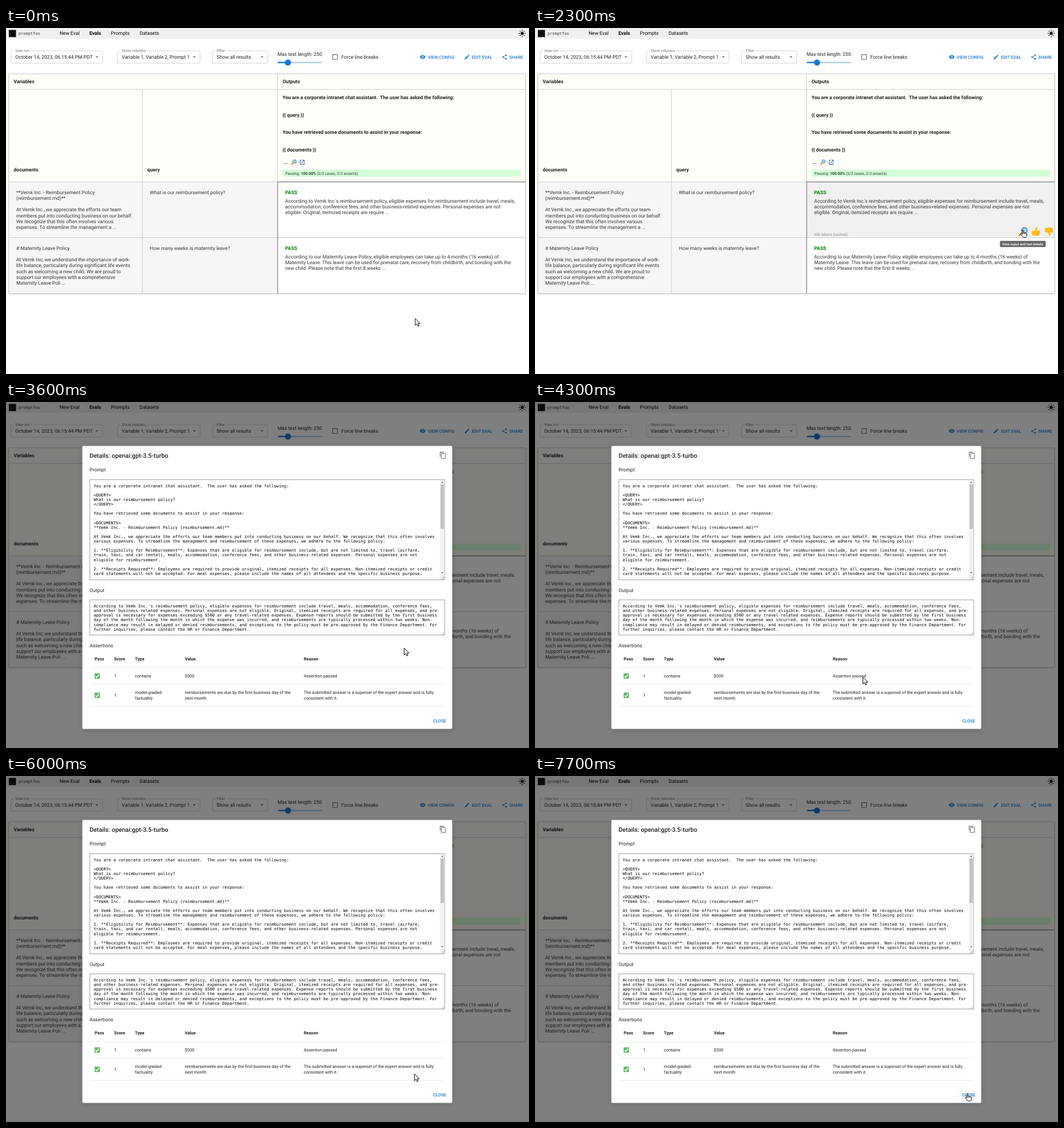
These frames come from a looping animation (920x608 px, 8000 ms). An HTML page:

```html
<!DOCTYPE html>
<html lang="en">
<head>
<meta charset="utf-8">
<title>Eval viewer</title>
<style>
  html, body { margin: 0; width: 100%; height: 100%; overflow: hidden; background: #fff; }
  svg { display: block; width: 920px; height: 608px; }
  text { font-family: Roboto, sans-serif; white-space: pre; text-rendering: geometricPrecision; }
  text.mono { font-family: "DejaVu Sans Mono", monospace; }
</style>
</head>
<body>
<svg id="stage" viewBox="0 0 920 608"></svg>
<script>
const K = 920 / 1700; // page zoom: CSS pixels to stage pixels
const INK = '#212121', BLUE = '#1976d2', LINE = '#ccc', DARK = '#888';
const ROW_H = 98;

const esc = s => s.replace(/&/g, '&amp;').replace(/</g, '&lt;');
const text = (x, y, s, { size = 16, weight = 400, fill = INK, cls = '' } = {}) =>
  `<text class="${cls}" x="${x}" y="${y}" font-size="${size * K}" font-weight="${weight}" fill="${fill}">${esc(s)}</text>`;
const lines = (x, y, pitch, list, opts) =>
  list.map((s, i) => s && text(x, y + i * pitch * K, s, opts)).join('');
const rect = (x, y, x2, y2, fill, extra = '') =>
  `<rect x="${x}" y="${y}" width="${x2 - x}" height="${y2 - y}" fill="${fill}" ${extra}/>`;
const path = (d, fill, extra = '') => `<path d="${d}" fill="${fill}" ${extra}/>`;
const stroke = (d, color, width, extra = '') =>
  path(d, 'none', `stroke="${color}" stroke-width="${width}" ${extra}`);
const group = (x, y, scale, body, extra = '') =>
  `<g transform="translate(${x} ${y}) scale(${scale})" ${extra}>${body}</g>`;
// 24-unit icon centred on a point
const icon = (cx, cy, size, body) => group(cx - size * K / 2, cy - size * K / 2, size * K / 24, body);

const bold = { weight: 700 };
const mono = { size: 13.36, cls: 'mono', fill: '#000' };
const cellText = { fill: '#333' };
const small = { size: 14 };
const button = { size: 14, weight: 500, fill: BLUE };

const magnifier = (x, y, size) => group(x, y, size / 16,
  stroke('M7 9L1.8 14.2', '#e8912d', 3, 'stroke-linecap="round"') +
  '<circle cx="10.2" cy="5.8" r="4.7" fill="#9fd3f5" stroke="#4a7fa8" stroke-width="1.5"/>');

const thumb =
  path('M1 8q0-1 1-1h2.5c2-1 3-3 3-5.5c0-1.5 2.4-1.6 2.8.6c.3 1.6-.2 2.8-.6 4h4c1.6 0 1.8 2 .6 2.4c1.3.5 1 2.2-.2 2.4c.9.7.4 2.1-.7 2.2c.6.9-.2 1.9-1.4 1.9H7c-2 0-2.5-1-4-1H2q-1 0-1-1z', '#fbbf24') +
  stroke('M10 8.5h4.3M10 10.9h4M10 13.1h3.3', '#e59a0c', .7);

const check = (x, y) =>
  rect(x, y, x + 9.4, y + 9.4, '#5fb863', 'rx="1"') +
  stroke(`M${x + 1.6} ${y + 5}l2.2 2.3l4-5.3`, '#fff', 1.6);

const select = (x, x2, label, labelEnd, value) =>
  stroke(`M${labelEnd + 2} 40.2H${x2 - 2.2}q2.2 0 2.2 2.2V59.6q0 2.2-2.2 2.2H${x + 2.2}q-2.2 0-2.2-2.2V42.4q0-2.2 2.2-2.2H${x + 5}`, '#c0c0c0', .7) +
  text(x + 7.4, 42.3, label, { size: 12, fill: '#666' }) +
  text(x + 7.4, 53.9, value) +
  path(`M${x2 - 12.8} 49.7h5.4l-2.7 2.7z`, '#757575');

function toolbar() {
  const rays = Array.from({ length: 8 }, (_, i) =>
    `<path d="M0-4.4V-5.8" transform="rotate(${i * 45})"/>`).join('');
  const eye = path('M12 4.5C7 4.5 2.7 7.6 1 12c1.7 4.4 6 7.5 11 7.5s9.3-3.1 11-7.5c-1.7-4.4-6-7.5-11-7.5z', BLUE) +
    '<circle cx="12" cy="12" r="4" fill="' + BLUE + '" stroke="#fff" stroke-width="2"/>';
  const pen = path('M3 17.3V21h3.7L17.8 9.9l-3.7-3.7zM20.7 7c.4-.4.4-1 0-1.4l-2.3-2.3c-.4-.4-1-.4-1.4 0l-1.9 1.8 3.8 3.8z', BLUE);
  const share = stroke('M18 5L6 12L18 19', BLUE, 2) +
    [[18, 5], [6, 12], [18, 19]].map(([x, y]) => `<circle cx="${x}" cy="${y}" r="3" fill="${BLUE}"/>`).join('');
  return rect(0, 0, 920, 19, '#f0f0f0') +
    rect(5, 3.4, 17.6, 16, '#111') +
    text(22, 12, 'promptfoo', { size: 13, cls: 'mono', fill: '#333' }) +
    text(94.2, 12.4, 'New Eval', { fill: '#000' }) + text(146.8, 12.4, 'Evals', { weight: 700, fill: '#000' }) +
    text(184.6, 12.4, 'Prompts', { fill: '#000' }) + text(235, 12.4, 'Datasets', { fill: '#000' }) +
    group(908, 9.4, 1, `<circle r="2.8" fill="#222"/><g stroke="#222" stroke-width="1.1" stroke-linecap="round">${rays}</g>`) +
    select(8.8, 170, 'View run', 42, 'October 14, 2023, 06:15:44 PM PDT') +
    select(196.2, 341.3, 'Show columns', 246, 'Variable 1, Variable 2, Prompt 1') +
    select(363.2, 460.4, 'Filter', 386, 'Show all results') +
    text(477.8, 48.6, 'Max text length: 250') +
    rect(478, 59.6, 556, 61.8, '#a7c8ec', 'rx="1.1"') + rect(478, 59.6, 496, 61.8, BLUE, 'rx="1.1"') +
    `<circle cx="496" cy="60.7" r="5.4" fill="${BLUE}"/>` +
    rect(574.7, 46.6, 583.3, 55.2, 'none', 'rx=".6" stroke="#666" stroke-width="1.1"') +
    text(589.8, 53.9, 'Force line breaks') +
    icon(733, 51, 20, eye) + text(742, 53.6, 'VIEW CONFIG', button) +
    icon(811, 51, 20, pen) + text(819.8, 53.6, 'EDIT EVAL', button) +
    icon(877, 51, 20, share) + text(885.6, 53.6, 'SHARE', button);
}

const row = (y, doc, query, answer) =>
  lines(18, y + 21.1, 19, doc, cellText) +
  text(253, y + 21.1, query, cellText) +
  text(491, y + 21.6, 'PASS', { weight: 700, fill: '#008000' }) +
  lines(491, y + 36.1, 19, answer, cellText);

const hoverBar = (id, y) => `<g id="${id}">` +
  magnifier(850.5, y + 79, 16.5) + group(873, y + 79, 1.03, thumb) +
  `<g transform="translate(896 ${y + 95.5}) scale(1.03 -1.03)">${thumb}</g></g>`;

function table() {
  const open = stroke('M10 4H4V20H20V14M13 4H20V11M20 4L9 15', '#24508f', 2.2);
  const prompt = ['You are a corporate intranet chat assistant.  The user has asked the following:',
    '{{ query }}', 'You have retrieved some documents to assist in your response:', '{{ documents }}'];
  return rect(5, 80.5, 914, 466.5, '#fff', 'style="filter:drop-shadow(0 1px 1.5px rgba(0,0,0,.22))"') +
    rect(5, 80.5, 914, 270.5, '#fffdf7') +
    rect(5, 270.5, 478, 466.5, '#f6f6f6') +
    rect(478, 270.5, 914, 368.5, '#f0f0f0', 'id="bg0"') +
    rect(478, 368.5, 914, 466.5, '#f0f0f0', 'id="bg1"') +
    stroke('M5 80.5H914V466.5H5ZM5 108H914M5 270.5H478M5 368.5H914M240 108V466.5M477.6 80.5V270.5', LINE, 1.1) +
    stroke('M477.8 466.5V270.5H914', DARK, 1.4) +
    text(13.5, 97, 'Variables', bold) + text(486.4, 97, 'Outputs', bold) +
    text(13.5, 252, 'documents', bold) + text(248.6, 252, 'query', bold) +
    lines(486.4, 124.6, 57.1, prompt, bold) +
    text(488.2, 238.6, '...', bold) + magnifier(501, 230.8, 10.4) + icon(521, 235.8, 20, open) +
    rect(486.4, 249, 905.5, 261.3, '#d1ffd7') +
    `<text x="491.6" y="257.5" font-size="${12.5 * K}" fill="#333">Passing: <tspan font-weight="700">100.00%</tspan> (2/2 cases, 3/3 asserts)</text>` +
    row(270.5, ['**Vemk Inc. - Reimbursement Policy', '(reimbursement.md)**', '',
      'At Vemk Inc., we appreciate the efforts our team', 'members put into conducting business on our behalf.',
      'We recognize that this often involves various', 'expenses. To streamline the management a ...'],
      'What is our reimbursement policy?',
      ["According to Vemk Inc.'s reimbursement policy, eligible expenses for reimbursement include travel, meals,",
        'accommodation, conference fees, and other business-related expenses. Personal expenses are not',
        'eligible. Original, itemized receipts are require ...']) +
    row(270.5 + ROW_H, ['# Maternity Leave Policy', '',
      'At Vemk Inc, we understand the importance of work-', 'life balance, particularly during significant life events',
      'such as welcoming a new child. We are proud to', 'support our employees with a comprehensive', 'Maternity Leave Poli ...'],
      'How many weeks is maternity leave?',
      ['According to our Maternity Leave Policy, eligible employees can take up to 4 months (16 weeks) of',
        'Maternity Leave. This leave can be used for prenatal care, recovery from childbirth, and bonding with the',
        'new child. Please note that the first 8 weeks ...']) +
    hoverBar('bar0', 270.5) + hoverBar('bar1', 270.5 + ROW_H) +
    `<g id="tokens">${text(491, 364.8, '606 tokens (cached)', { size: 12, fill: '#888' })}</g>` +
    `<g id="tip">${rect(817.8, 374, 898.4, 385, '#616161', 'rx="2" fill-opacity=".94"')}
      ${text(821.8, 381.7, 'View ouput and test details', { size: 11, weight: 500, fill: '#fff' })}</g>`;
}

const area = (y, y2, list) =>
  rect(147.5, y, 771.8, y2, '#fff', 'stroke="#767676" stroke-width=".7"') +
  lines(154.2, y + 13.3, 15, list, mono);
const grip = y => stroke(`M766 ${y}l5-5M768.6 ${y}l2.4-2.4`, '#777', .6);

function dialog() {
  const copy = stroke('M3 17V2H16', '#666', 2) + rect(7, 6, 20, 22, 'none', 'rx="1" stroke="#666" stroke-width="2"');
  const heads = [[156, 'Pass'], [190, 'Score'], [226.8, 'Type'], [314.4, 'Value'], [523.8, 'Reason']];
  return rect(0, 0, 920, 608, '#000', 'fill-opacity=".5"') +
    rect(134.3, 77.3, 785, 574.4, '#fff', 'rx="2.2" style="filter:drop-shadow(0 3px 5px rgba(0,0,0,.14))"') +
    text(147, 98.4, 'Details: openai:gpt-3.5-turbo', { size: 20, weight: 500 }) +
    icon(768.6, 93.8, 24, copy) +
    text(147, 122.1, 'Prompt') +
    area(136.4, 312.4, ['You are a corporate intranet chat assistant.  The user has asked the following:', '',
      '<QUERY>', 'What is our reimbursement policy?', '</QUERY>', '',
      'You have retrieved some documents to assist in your response:', '',
      '<DOCUMENTS>', '**Vemk Inc. - Reimbursement Policy (reimbursement.md)**', '',
      'At Vemk Inc., we appreciate the efforts our team members put into conducting business on our behalf. We recognize that this often involves',
      'various expenses. To streamline the management and reimbursement of these expenses, we adhere to the following policy:', '',
      '1. **Eligibility for Reimbursement**: Expenses that are eligible for reimbursement include, but are not limited to, travel (airfare,',
      'train, taxi, and car rental), meals, accommodation, conference fees, and other business-related expenses. Personal expenses are not',
      'eligible for reimbursement.', '',
      '2. **Receipts Required**: Employees are required to provide original, itemized receipts for all expenses. Non-itemized receipts or credit',
      'card statements will not be accepted. For meal expenses, please include the names of all attendees and the specific business purpose.']) +
    rect(763.4, 136.8, 771.4, 312, '#f1f1f1') + rect(764.4, 144.6, 770.4, 223, '#c1c1c1') +
    path('M765.6 142h3.6l-1.8-2zM765.6 299h3.6l-1.8 2z', '#505050') + grip(311.4) +
    text(147, 333.6, 'Output') +
    area(347.8, 409.6, [
      "According to Vemk Inc.'s reimbursement policy, eligible expenses for reimbursement include travel, meals, accommodation, conference fees,",
      'and other business-related expenses. Personal expenses are not eligible. Original, itemized receipts are required for all expenses, and pre-',
      'approval is necessary for expenses exceeding $500 or any travel-related expenses. Expense reports should be submitted by the first business',
      'day of the month following the month in which the expense was incurred, and reimbursements are typically processed within two weeks. Non-',
      'compliance may result in delayed or denied reimbursements, and exceptions to the policy must be pre-approved by the Finance Department. For',
      'further inquiries, please contact the HR or Finance Department.']) + grip(408.8) +
    text(147, 431.1, 'Assertions') +
    heads.map(([x, s]) => text(x, 454, s, { size: 14, weight: 700 })).join('') +
    stroke('M147.3 467H772M147.3 495.6H772M147.3 535H772', '#e0e0e0', .7) +
    check(155.8, 476.8) + text(190, 484, '1', small) + text(226.8, 484, 'contains', small) +
    text(314.4, 484, '$500', small) + text(523.8, 484, 'Assertion passed', small) +
    check(155.8, 510.8) + text(190, 518, '1', small) +
    lines(226.8, 512.6, 20, ['model-graded-', 'factuality'], small) +
    lines(314.4, 512.6, 20, ['reimbursements are due by the first business day of the', 'next month'], small) +
    lines(523.8, 512.6, 20, ['The submitted answer is a superset of the expert answer and is fully', 'consistent with it.'], small) +
    rect(745.5, 550.5, 780, 570.5, BLUE, 'id="closeBg" rx="2.2" fill-opacity=".04"') +
    text(751.4, 563, 'CLOSE', button);
}

const outline = 'stroke="#000" stroke-width="1" stroke-linejoin="round"';
const pointers =
  `<g id="arrow">${path('M.4.4V12.6L3.2 10L5.1 14.2L7 13.4L5.2 9.2H9Z', '#fff', outline)}</g>` +
  `<g id="hand">${group(-4.4, 0, 1, path('M3 1.4c0-1.5 2-1.5 2 0V5c.5-.6 1.8-.4 2 .5c.6-.6 1.8-.3 2 .6c.8-.5 1.9 0 1.9 1.2V10c0 2.6-1.3 3.6-4 3.6C4.5 13.6 3.6 12.8 2.6 11L.6 8.4C-.2 7.2 1 6.3 2 7.2L3 8.2z', '#fff', outline) + stroke('M5 5V8M7 5.6V8M9 6.2V8', '#000', .7))}</g>`;

document.getElementById('stage').innerHTML = toolbar() + table() +
  `<g id="dialog">${dialog()}</g><g id="pointer">${pointers}</g>`;

const el = id => document.getElementById(id);
const show = (id, on) => el(id).setAttribute('visibility', on ? 'inherit' : 'hidden');

const LOOP = 8000, STEP = 100, OPEN = 2800;
// pointer route: time, x, y
const route = [
  [600, 719.5, 510], [1000, 726, 508], [1100, 726, 508], [1900, 910, 357], [2000, 910, 357],
  [2300, 858.5, 354.5], [2700, 858.5, 354.5], [2800, 858, 355.6], [3600, 700, 432], [4100, 608, 481],
  [4200, 608, 481], [4300, 576.5, 483], [4700, 400, 477], [5100, 223.5, 482], [5200, 224, 496],
  [5300, 224, 496], [5400, 224, 503], [6100, 747, 524], [6200, 747, 524], [6800, 746.8, 536],
  [7000, 746.8, 536], [7700, 761, 557.6]
];

function pointerAt(t) {
  const i = route.findIndex(p => p[0] >= t);
  if (i < 1) return (i ? route[route.length - 1] : route[0]).slice(1);
  const [t0, x0, y0] = route[i - 1], [t1, x1, y1] = route[i];
  const p = (t - t0) / (t1 - t0), e = p * p * (3 - 2 * p);
  return [x0 + (x1 - x0) * e, y0 + (y1 - y0) * e];
}

function draw(ms) {
  const t = Math.floor(ms % LOOP / STEP) * STEP;
  const [x, y] = pointerAt(t);
  const modal = t >= OPEN;
  const over = (x0, y0, x1, y1) => x > x0 && x < x1 && y > y0 && y < y1;
  for (const i of [0, 1]) {
    const top = 270.5 + i * ROW_H;
    const hovered = !modal && over(478, top, 914, top + ROW_H);
    show('bg' + i, hovered);
    show('bar' + i, hovered);
    if (i === 0) show('tokens', hovered);
  }
  const onClose = modal && over(745.5, 550.5, 780, 570.5);
  const hand = onClose || !modal && over(850, 349, 912, 367);
  show('tip', !modal && t >= 2200);
  show('dialog', modal);
  show('closeBg', onClose);
  show('hand', hand);
  show('arrow', !hand);
  el('pointer').setAttribute('transform', `translate(${x} ${y})`);
}

const start = performance.now();
function tick() {
  draw(performance.now() - start);
  requestAnimationFrame(tick);
}
tick();
</script>
</body>
</html>
```
